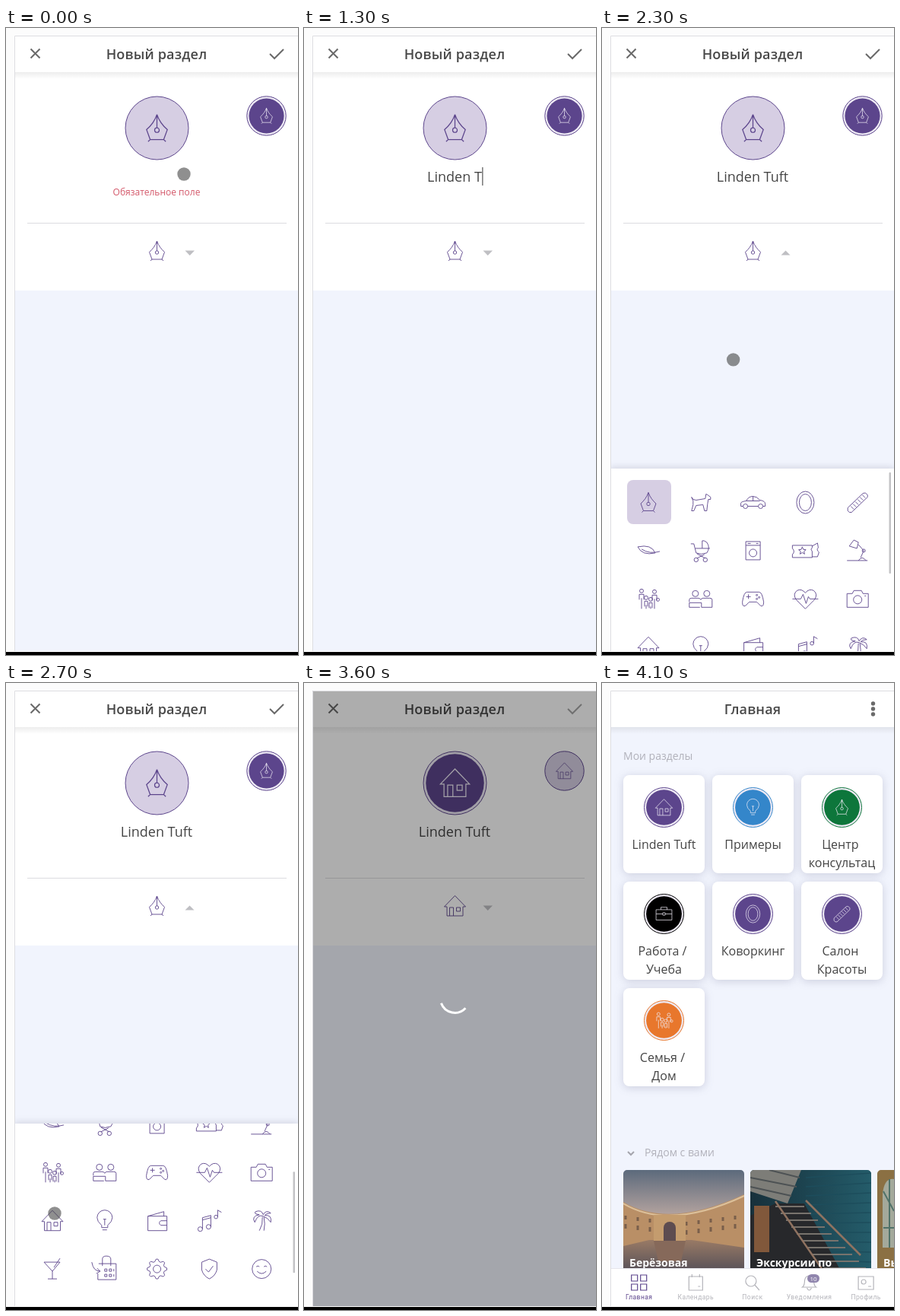
These frames come from a looping animation (384 by 824 pixels, 4.2 s). An HTML page:

```html
<!DOCTYPE html>
<html lang="ru">
<head>
<meta charset="utf-8">
<style>
  html, body { margin: 0; width: 384px; height: 824px; overflow: hidden; background: #fcfcfc; }
  svg { display: block; font-family: "Open Sans", sans-serif; }
  .title { font-weight: 600; letter-spacing: .2px; }
  .card { filter: drop-shadow(0 2px 6px rgba(60, 60, 100, .2)); }
  .sheet { filter: drop-shadow(0 -2px 4px rgba(60, 60, 90, .16)); }
  .nav { font: 8.5px Roboto, sans-serif; letter-spacing: .45px; }
</style>
</head>
<body>
<svg id="stage" width="384" height="824" viewBox="0 0 384 824">
  <defs>
    <clipPath id="phone"><rect x="11" y="10" width="373" height="809"/></clipPath>
    <clipPath id="panel"><rect x="11" y="579" width="373" height="240"/></clipPath>
    <clipPath id="photos">
      <rect x="28" y="640" width="159" height="140" rx="5"/>
      <rect x="195" y="640" width="159" height="140" rx="5"/>
      <rect x="362" y="640" width="159" height="140" rx="5"/>
    </clipPath>
    <linearGradient id="fall" x2="0" y2="1"><stop stop-opacity=".07"/><stop offset="1" stop-opacity="0"/></linearGradient>
    <linearGradient id="sky" x2="0" y2="1"><stop stop-color="#5c6a7c"/><stop offset="1" stop-color="#cbb2a8"/></linearGradient>
    <linearGradient id="water" x2="0" y2="1"><stop stop-color="#9c7c66"/><stop offset="1" stop-color="#4c4a56"/></linearGradient>
    <linearGradient id="wall"><stop stop-color="#17303b"/><stop offset="1" stop-color="#245c6a"/></linearGradient>
  </defs>
  <g id="screen" clip-path="url(#phone)"></g>
  <path d="M11.5 819V10.5H384" fill="none" stroke="#dedee2"/>
  <rect y="820" width="384" height="4"/>
</svg>
<script>
const LOOP = 4200, NAME = 'Linden Tuft';
const PURPLE = '#5c458c', PALE = '#d6cee3', PAGE = '#f1f4fd', GRAY = '#6a6a6a';
const screen = document.getElementById('screen');
const pen = document.createElement('canvas').getContext('2d');

// Path pieces
const oval = (x, y, a, b = a) => `M${x - a} ${y}a${a} ${b} 0 1 0 ${2 * a} 0a${a} ${b} 0 1 0 ${-2 * a} 0`;
const person = (x, top, foot, w = 3) => oval(x, top + 2.5, 2.5) + `M${x - w} ${top + 14}V${top + 7}H${x + w}V${top + 14}M${x} ${top + 12}V${foot}`;
const cog = () => {
  const points = [];
  for (let i = 0; i < 32; i++) {
    const a = (i - .5) * Math.PI / 16, r = i % 4 < 2 ? 13 : 10;
    points.push((r * Math.cos(a)).toFixed(1) + ' ' + (r * Math.sin(a)).toFixed(1));
  }
  return 'M' + points.join('L') + 'Z';
};

const ICONS = {
  nib: 'M0-13C-2-7-6-2-10 1.5L-6.5 11H6.5L10 1.5C6-2 2-7 0-13V0M-8.5 13L-6.5 11M8.5 13L6.5 11' + oval(0, 2, 2.2),
  dog: 'M-12-7L-10-2V3L-12 11H-9L-6 4 3 3 5 11H8L9 2 10-4H13V-7L9-10 7-11 6-5-6-3Q-11-3-12-7Z',
  car: 'M-13 5H-16V1Q-16-1-9-2-6-8 0-8 5-8 9-3 16-2 16 2V5H13M-7 5H7M-9-2H9M0-8V-2' + oval(-10, 5, 3) + oval(10, 5, 3),
  mirror: oval(0, 0, 11.5, 14.5) + oval(0, 0, 8, 11),
  comb: 'M-13 7L7-12Q10-14 13-10V-7L-8 13Q-11 14-13 11ZM-9 5l4 4M-6 2l4 4M-3-1l4 4M0-4l4 4M3-7l4 4M6-10l4 4',
  leaf: 'M-14-5Q4-9 9 3-8 7-14-5ZM-9-2Q2 5 15 1',
  pram: 'M-13-9H-9L-6 3Q0 6 8 3 13-4 8-11 4-14 2-13V-3H12M-7-3H2M-5 4L6 10M5 5L-5 10' + oval(-6, 12, 2.7) + oval(6, 12, 2.7),
  washer: 'M-9.5-12H9.5V12H-9.5ZM-9.5-7H9.5M-7-9.5h4M4-9.5h3' + oval(0, 3, 5),
  ticket: 'M-17-7H9V-4Q6-2 9 1V9H-17V5Q-13 1-17-3ZM9-6L16-10 17-4Q14-1 18 2L16 8H9M-4-5l1.4 3.4 3.4.4-2.6 2.2.8 3.4-3-1.8-3 1.8.8-3.4-2.6-2.2 3.4-.4z',
  lamp: 'M-14 13H13M-11-6L-5-14 1-11-1-3ZM1-8L8 0 4 9M1 13Q6 6 11 13' + oval(8, 0, 2),
  family: person(-9, -13, 13) + person(8, -12, 13) + person(-3, -4, 13, 2) + person(3, -2, 13, 2) + oval(12.5, 1, 2),
  couple: oval(-7, -7, 4) + oval(8, -7, 4) + 'M-15 4V1Q-15-1-12-1H-3Q-1-1 0 1 1-1 3-1H12Q15-1 15 1V11H1V5H-15V11H-1',
  gamepad: 'M-8-9H8Q12-9 14 4 14 11 10 9L5 4H-5L-10 9Q-14 11-14 4-12-9-8-9ZM-9-3h6M-6-6v6' + oval(5, -5, 1) + oval(8, -2, 1) + oval(5, 0, 1),
  heart: 'M0 13L-12 1Q-17-6-11-11-5-14 0-8 5-14 11-11 17-6 12 1ZM-17 0H-6L-3-6 1 6 4-3 6 0H17',
  camera: 'M-14-7H-7L-5-11H5L7-7H14V11H-14ZM9-4h2' + oval(0, 1, 5.5),
  house: 'M-14 1L0-13.5 14 1H10.5V13H-10.5V1ZM-7 13V2H-2V13M2 2H7V7H2Z',
  bulb: 'M-4 9V6Q-10 1-10-4A10 10 0 0 1 10-4Q10 1 4 6V9ZM-3 12H3M0 6V-2M-2-2H2',
  wallet: 'M-12-6H13V13H-12ZM-12-6L9-12V-6M13 0H5Q1 3 5 6H13',
  music: 'M-9 11V-4L2-7V8M-9-1L2-4M11-5V-14L16-11' + oval(-12, 11, 3) + oval(-1, 8, 3) + oval(8.7, -5, 2.3),
  palm: 'M-3 13Q2 5 1-5M3 13Q5 4 3-5M2-6Q-5-9-9 2-14-6-3-8-11-9-8-12 0-15 2-8 6-15 12-10 6-10 4-7 14-8 12 2 8-4 2-6',
  cocktail: 'M-11-9H10L0 3ZM0 3V13M-6 13H6M2-2L10-14',
  planner: 'M-8-7H15V14H-9V6M-3-4V-13Q-3-17 2-17 8-17 8-13V-4M-17-9Q-15 3-6 3M-10-1L-6 3-11 6M0 0h3v3h-3zM6 0h3v3h-3zM0 7h3v3h-3zM6 7h3v3h-3zM12 0v3M12 7v3',
  gear: cog() + oval(0, 0, 5),
  shield: 'M0-13L10-9V1Q8 9 0 13-8 9-10 1V-9ZM-5 0L-1 4 5-4',
  smile: oval(0, 0, 12.5) + 'M-6 3Q0 9 6 3M-7-3q2-2 4 0M3-3q2-2 4 0',
  briefcase: 'M-13-7H13V10H-13ZM-5-7V-11H5V-7M-13 0H-2M2 0H13M-2-2H2V2H-2Z',
};

// Drawing helpers
const rect = (x, y, w, h, fill, more = '') => `<rect x="${x}" y="${y}" width="${w}" height="${h}" fill="${fill}" ${more}/>`;
const line = (d, color, width = 1) => `<path d="${d}" fill="none" stroke="${color}" stroke-width="${width}"/>`;
const shape = (d, fill) => `<path d="${d}" fill="${fill}"/>`;
const disc = (x, y, r, fill, more = '') => `<circle cx="${x}" cy="${y}" r="${r}" fill="${fill}" ${more}/>`;
const text = (s, x, y, size, fill, more = 'text-anchor="middle"') => `<text x="${x}" y="${y}" font-size="${size}" fill="${fill}" ${more}>${s}</text>`;
const icon = (name, x, y, scale = 1, color = PURPLE) => `<g transform="translate(${x} ${y}) scale(${scale})">${line(ICONS[name], color, .9)}</g>`;
const badge = (name, x, y, r, scale, color, filled) =>
  disc(x, y, r, filled ? '#eeeaf5' : PALE, `stroke="${color}"`) +
  (filled ? disc(x, y, r * .96 - 1.6, color) : '') +
  icon(name, x, y, scale, filled ? '#f0ecf6' : color);
const header = title => rect(11, 58, 373, 9, 'url(#fall)') + rect(11, 10, 373, 48, '#fff') +
  text(title, 198, 41, 18, '#484848', 'text-anchor="middle" class="title"');

// Time helpers
const ramp = (t, from, to) => Math.min(1, Math.max(0, (t - from) / (to - from)));
const smooth = p => p * p * (3 - 2 * p);
const POINTER = [[0, 234, 192], [1700, 234, 192], [1800, 241, 295], [1870, 241, 295], [2300, 173, 435], [2600, 64, 697],
  [2800, 64, 697], [3100, 342, 115], [3200, 342, 115], [3400, 356, 34]];

function pointer(t) {
  if (t >= 3450 || (t >= 300 && t < 1700)) return '';
  let [, x, y] = POINTER[0];
  for (let i = 1; i < POINTER.length; i++) {
    const [t0, x0, y0] = POINTER[i - 1], [t1, x1, y1] = POINTER[i], p = ramp(t, t0, t1);
    if (t >= t0) { x = x0 + (x1 - x0) * p; y = y0 + (y1 - y0) * p; }
  }
  return disc(x, y, 8.7, '#444', 'opacity=".6"');
}

const GRID = 'nib dog car mirror comb leaf pram washer ticket lamp family couple gamepad heart camera house bulb wallet music palm cocktail planner gear shield smile'
  .split(' ').map((name, i) => icon(name, 61 + i % 5 * 68.8, 623.5 + Math.floor(i / 5) * 63.4)).join('');

function sheet(t) {
  const shown = smooth(ramp(t, 1850, 1980)) - smooth(ramp(t, 2800, 2920));
  if (shown <= 0) return '';
  const scroll = 107 * smooth(ramp(t, 2380, 2640));
  return `<g transform="translate(0 ${250 * (1 - shown)})">` + rect(11, 579, 373, 241, '#fff', 'class="sheet"') +
    `<g clip-path="url(#panel)"><g transform="translate(0 ${-scroll})">` +
    rect(33, 594, 58, 58, PALE, 'rx="8"') + GRID + '</g></g>' +
    rect(377.5, 584 + scroll * .545, 2.5, 133, '#c3c3c6', 'rx="1"') + '</g>';
}

function field(t) {
  const typed = NAME.slice(0, Math.max(0, Math.floor((t - 500) / 100)));
  pen.font = '18px "Open Sans", sans-serif';
  const caretX = 199 + pen.measureText(typed).width / 2;
  return text(typed, 198, 202, 18, '#444') +
    (typed ? '' : text('Обязательное поле', 198, 220, 12, '#d4586a')) +
    (t >= 300 && t < 1700 ? line(`M${caretX} 183V207`, '#333') : '');
}

function loader(t) {
  return rect(11, 10, 373, 809, '#000', 'opacity=".32"') +
    `<g transform="rotate(${(t - 3600) * .6} 198 414)">` + line('M212.5 427A19 19 0 0 1 180.5 421', '#fff', 3) + '</g>';
}

function editor(t) {
  const name = t < 2800 ? 'nib' : 'house', swapped = t >= 3200;
  const open = t >= 1850 && t < 2800;
  return rect(11, 10, 373, 809, PAGE) + rect(11, 58, 373, 287, '#fff') + header('Новый раздел') +
    line('M32.5 27.5L44.5 39.5M44.5 27.5L32.5 39.5', GRAY, 2) +
    line('M347 34L353 40 365 28', t < 3400 ? GRAY : '#a5a5a5', 2) +
    badge(name, 198.5, 131.5, 41.5, 1.37, PURPLE, swapped) +
    badge(name, 342.5, 115.5, 25.7, .79, PURPLE, !swapped) +
    field(t) + line('M28 256.5H369', '#dcdce0') + icon(name, 198.5, 293) +
    shape(open ? 'M235.5 298.5H247.5L241.5 292.5Z' : 'M235.5 292.5H248L241.7 299Z', '#bfbfc3') +
    sheet(t) + pointer(t) + (t >= 3600 ? loader(t) : '');
}

// Wrapped lines keep their trailing space, which shifts the centred text
const CARDS = [
  ['house', PURPLE, NAME], ['bulb', '#3486ca', 'Примеры'], ['nib', '#0d763b', 'Центр&nbsp;', 'консультац'],
  ['briefcase', '#000', 'Работа /&nbsp;', 'Учеба'], ['mirror', PURPLE, 'Коворкинг'], ['comb', PURPLE, 'Салон&nbsp;', 'Красоты'],
  ['family', '#e8772c', 'Семья /&nbsp;', 'Дом'],
];
const card = ([name, color, ...lines], i) => {
  const x = 28 + i % 3 * 117, y = 121 + Math.floor(i / 3) * 140;
  return rect(x, y, 107, 129, '#fff', 'rx="8" class="card"') + badge(name, x + 53.5, y + 42.5, 26, .8, color, true) +
    lines.map((s, k) => text(s, x + 53.5, y + 97 + k * 24, 16, '#444')).join('');
};

function photos() {
  let windows = '', steps = '', bricks = '';
  for (let i = 0; i < 10; i++) {
    windows += `M${31 + i * 16} ${709 - Math.abs(4.5 - i) * 2}v5m0 6v6`;
    steps += `M${228 + i * 7} ${688 + i * 9}h${38 + i * 2}`;
    bricks += `M268 ${650 + i * 12}L354 ${644 + i * 13}`;
  }
  return '<g clip-path="url(#photos)">' +
    rect(28, 640, 159, 75, 'url(#sky)') + rect(28, 730, 159, 50, 'url(#water)') +
    shape('M28 682Q88 718 187 672V742L118 732H62L28 740Z', '#b98f66') +
    line('M28 684Q88 720 187 674', '#dcc09a', 2) + line(windows, '#795f4b', 3) +
    rect(68, 699, 42, 34, '#c49c6e') + shape('M81 733V716A8 8 0 0 1 97 716V733Z', '#5d4c50') +
    shape('M68 733H110L104 760H74Z', '#86695a') +
    rect(195, 640, 159, 140, 'url(#wall)') + line(bricks, '#1d4d5c', 1.5) +
    shape('M195 640H262L244 684 195 668Z', '#7d7d78') + line('M195 650L256 662M195 662L249 674M220 640L260 650', '#4d5254', 2) +
    shape('M195 700L228 684H266L318 780H195Z', '#27282b') + line(steps, '#78736d', 2) +
    line('M228 681L296 780M268 680L340 752', '#8f7260', 2.5) + shape('M200 687H220V748H200Z', '#81583b') +
    rect(362, 640, 22, 140, '#8b7043') + shape('M369 742V672Q371 650 384 652V742Z', '#a4a99b') +
    line('M370 668L384 694M378 652V742M370 716H384', '#507269', 2) + '</g>' +
    [['Берёзовая', 36], ['Экскурсии по', 203], ['Вы', 370]]
      .map(([s, x]) => text(s, x, 767, 14, '#fff', 'font-weight="700"')).join('');
}

function tabs() {
  const muted = '#b4b4ba';
  const items = [
    ['Главная', 'M-10-10h8v8h-8zM2-10h8v8h-8zM-10 2h8v8h-8zM2 2h8v8h-8z'],
    ['Календарь', 'M-9-8H9V10H-9ZM-5-11V-7M5-11V-7M3 5h3'],
    ['Поиск', oval(-2, -2, 7) + 'M3 3L9 10'],
    ['Уведомления', 'M-9 6Q-6 4-6-3-5-9 0-9 5-9 6-3 6 4 9 6ZM-3 7Q0 13 3 7'],
    ['Профиль', 'M-10-8H10V9H-10ZM3 5h4' + oval(-3, -1, 3)],
  ];
  return rect(11, 769, 373, 50, '#fff') + line('M11 769.5H384', '#e6e6ec') +
    items.map(([label, d], i) => {
      const x = 48.7 + i * 74.6, color = i ? muted : PURPLE;
      return `<g transform="translate(${x} 788)">` + line(d, color, 1.2) + '</g>' +
        `<text class="nav" x="${x}" y="810" text-anchor="middle" fill="${color}">${label}</text>`;
    }).join('') +
    rect(270, 777, 16, 11, '#9085ad', 'rx="5.5"') + text('10', 278, 785.5, 8, '#fff');
}

const HOME = rect(11, 10, 373, 809, PAGE) + header('Главная') +
  [27, 34, 41].map(y => disc(356.5, y, 2.7, GRAY)).join('') +
  text('Мои разделы', 28, 101, 14, '#b1b1ba', '') + CARDS.map(card).join('') +
  line('M34 616L38 620 42 616', '#a5a5ad', 2) + text('Рядом с вами', 56, 622, 14, '#b1b1ba', '') +
  photos() + tabs();

function frame() {
  const t = performance.now() % LOOP;
  screen.innerHTML = t < 3800 ? editor(t) : HOME;
  requestAnimationFrame(frame);
}
frame();
</script>
</body>
</html>
```
